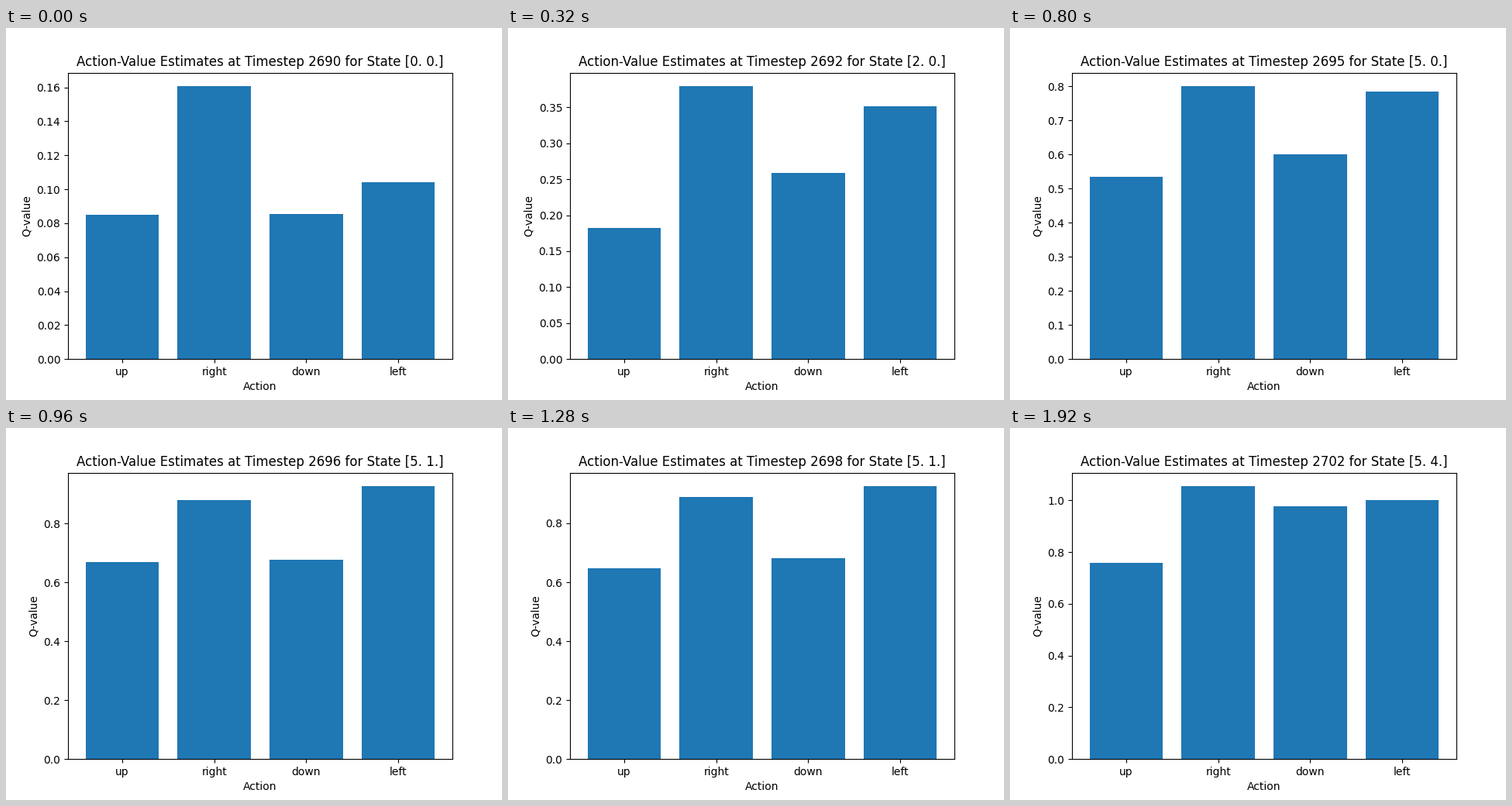
A matplotlib script that plays this animation: 640 px wide and 480 px high, repeating every 2080 ms.

```python
from collections import Counter

import matplotlib.pyplot as plt
import numpy as np
from matplotlib.animation import FuncAnimation

plt.rcParams["font.family"] = "DejaVu Sans"

FIRST_STEP = 2690
WALL = 5          # last column of the grid
REVISIT = 0.15    # learning progress gained by seeing a state again
MOVES = "RRRRRDUDDRDD"
SHIFT = {"R": (1, 0), "U": (0, -1), "D": (0, 1)}

# Each action's value grows along the path; key points by progress
PROGRESS = [0, 2, 4, 5, 6, 6 + REVISIT, 7 + REVISIT, 9]
VALUES = {
    "up": [0.0849, 0.1822, 0.3922, 0.535, 0.6695, 0.6475, 0.7713, 0.7587],
    "right": [0.1606, 0.3793, 0.6416, 0.800, 0.8800, 0.8894, 0.9570, 1.0548],
    "down": [0.0854, 0.2588, 0.5125, 0.600, 0.6770, 0.6815, 0.7740, 0.9775],
    "left": [0.1041, 0.3515, 0.6237, 0.785, 0.9270, 0.9257, 0.9759, 1.0015],
}


def walk(moves):
    """Yield the state and the learning progress at every step."""
    x = y = 0
    seen = Counter()
    for move in [None, *moves]:
        dx, dy = SHIFT.get(move, (0, 0))
        x, y = min(x + dx, WALL), y + dy
        yield (x, y), x + y + REVISIT * seen[x, y]
        seen[x, y] += 1


STEPS = list(walk(MOVES))
fig, ax = plt.subplots(figsize=(6.4, 4.8), dpi=100)


def draw(i):
    (x, y), progress = STEPS[i]
    heights = [np.interp(progress, PROGRESS, v) for v in VALUES.values()]
    ax.clear()
    ax.bar(list(VALUES), heights, color="#1f77b4")
    ax.set_xlabel("Action")
    ax.set_ylabel("Q-value")
    ax.set_title(f"Action-Value Estimates at Timestep {FIRST_STEP + i} "
                 f"for State [{x}. {y}.]")
    return []


anim = FuncAnimation(fig, draw, frames=len(STEPS), init_func=lambda: draw(0),
                     interval=160, repeat=True, repeat_delay=0, blit=False)
plt.show()
```
